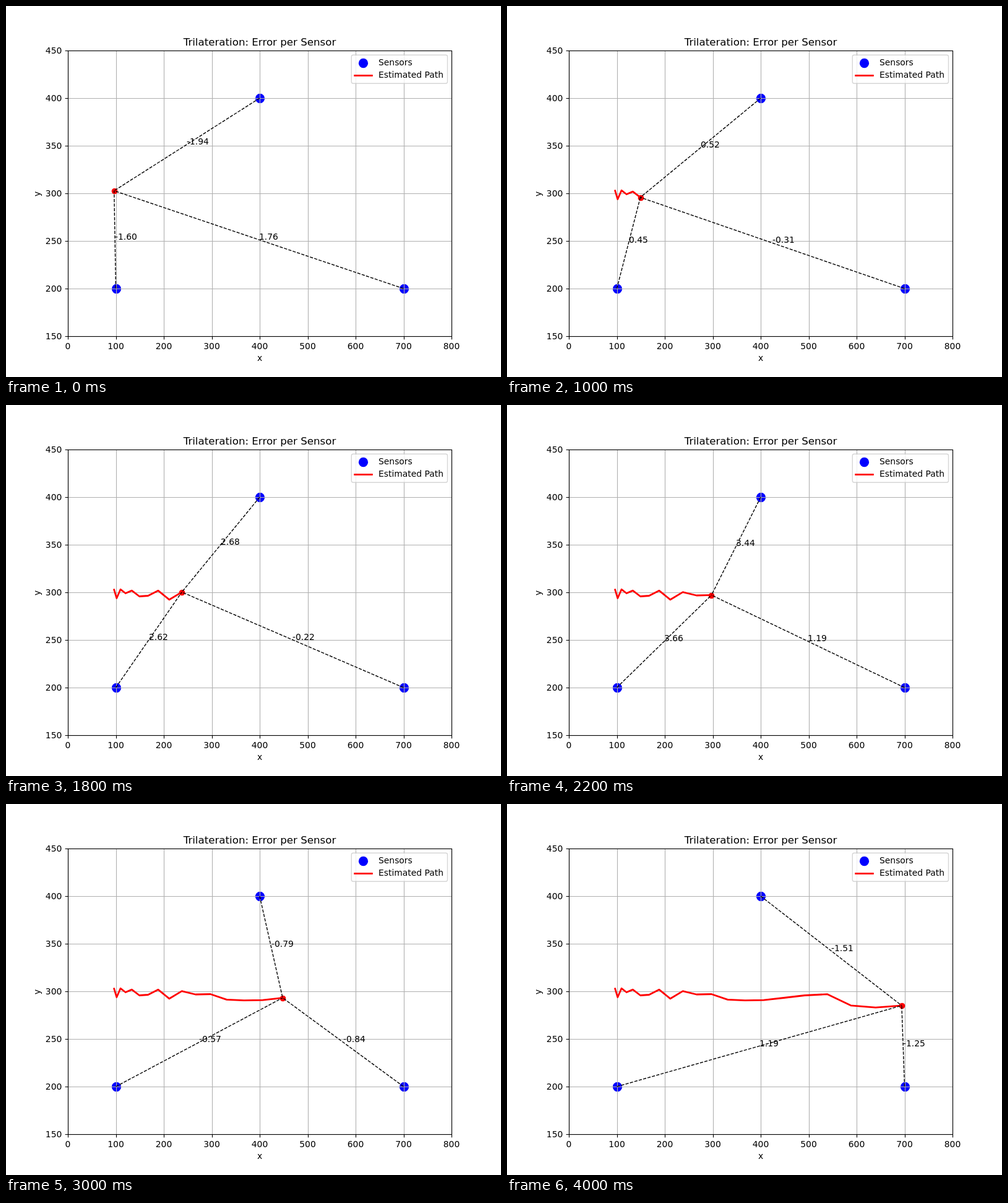
Recreate the animation shown at these times as an HTML page. Size 800 by 600 pixels, loop 4200 ms.

```html
<!DOCTYPE html>
<html lang="en">
<head>
<meta charset="utf-8">
<title>Trilateration: Error per Sensor</title>
<style>
  html, body { margin: 0; width: 100%; height: 100%; overflow: hidden; background: #fff; }
  svg { display: block; width: 800px; height: 600px; }
  text { font: 13.89px "DejaVu Sans", sans-serif; fill: #000; white-space: pre; }
  .title { font-size: 16.67px; }
  .mid { text-anchor: middle; }
  .end { text-anchor: end; }
  .sensor { fill: #00f; }
  .grid { stroke: #b0b0b0; stroke-width: 1.11; }
  .axis { stroke: #000; stroke-width: 1.11; fill: none; }
  .path { stroke: #f00; stroke-width: 2.78; stroke-linecap: square; stroke-linejoin: round; fill: none; }
  .ray { stroke: #000; stroke-width: 1.39; stroke-dasharray: 5.14 2.22; }
</style>
</head>
<body>
<svg id="stage" viewBox="0 0 800 600"></svg>
<script>
const STEP = 200;
const BOX = { left: 100, right: 720, top: 72, bottom: 534 };
const SENSORS = [[100, 200], [400, 400], [700, 200]];

// Noisy height of the estimate at each step, in pixels; its x speeds up evenly.
const HEIGHTS = [
  298.8, 312.5, 298.2, 304.5, 300.1, 309.5, 308.5, 300.2, 314.8, 302.6, 308,
  307.5, 316.4, 317.6, 317.2, 313.5, 309.5, 307.6, 325.8, 329.1, 326
];
const estimate = i => [174.7 + 3.16 * i + i * i, HEIGHTS[i]];

// Key steps and the signed size of the range error there
const SIZES = [[0, 3.067], [2, 1.632], [7, -2.349], [11, -5.159], [15, 1.29], [17, -2.982], [20, 2.292]];

const stage = document.getElementById("stage");
const px = x => BOX.left + x * 620 / 800;
const py = y => BOX.bottom - (y - 150) * 462 / 300;
const snap = v => Math.floor(v + 0.5) + 0.5;

function set(el, attrs) {
  for (const key in attrs) el.setAttribute(key, attrs[key]);
}
function add(tag, attrs, text) {
  const el = document.createElementNS("http://www.w3.org/2000/svg", tag);
  set(el, attrs);
  if (text !== undefined) el.textContent = text;
  return stage.appendChild(el);
}
const line = (cls, x1, y1, x2, y2) => add("line", { class: cls, x1, y1, x2, y2 });
const label = (cls, x, y, text) => add("text", { class: cls, x, y }, text);
const disc = (x, y) => add("circle", { class: "sensor", cx: x, cy: y, r: 7.64 });

function sizeAt(i) {
  const k = Math.max(1, SIZES.findIndex(([step]) => step >= i));
  const [[i0, a], [i1, b]] = [SIZES[k - 1], SIZES[k]];
  return a + (b - a) * (i - i0) / (i1 - i0);
}

// Least-squares residuals lie at right angles to both columns of direction cosines.
function residuals(x, y, size) {
  const [a, b, c] = spots.map(([sx, sy]) => {
    const d = Math.hypot(x - sx, y - sy);
    return [(x - sx) / d, (y - sy) / d];
  });
  const cross = (p, q) => q[0] * p[1] - p[0] * q[1];
  const n = [cross(b, c), cross(c, a), cross(a, b)];
  return n.map(v => v * size / Math.hypot(...n));
}

// Sensors and grid
const spots = SENSORS.map(([x, y]) => [px(x), py(y)]);
for (const [x, y] of spots) disc(snap(x), snap(y));

for (let v = 0; v <= 800; v += 100) {
  const x = snap(px(v));
  line("grid", x, BOX.top, x, BOX.bottom);
  line("axis", x, 534.5, x, 539.4);
  label("mid", px(v), 555, v);
}
for (let v = 150; v <= 450; v += 50) {
  const y = snap(py(v));
  line("grid", BOX.left, y, BOX.right, y);
  line("axis", 95.6, y, 100.5, y);
  label("end", 90.3, py(v) + 5, v);
}

// Moving parts
const trail = add("polyline", { class: "path" });
const dot = add("circle", { r: 4.86, fill: "#f00" });
const rays = spots.map(([x, y]) => line("ray", x, y, x, y));

add("rect", { class: "axis", x: 100.5, y: 72.5, width: 620, height: 462 });
label("mid title", 410, 64, "Trilateration: Error per Sensor");
label("mid", 410, 574, "x");
add("text", { class: "mid", transform: "translate(55 304) rotate(-90)" }, "y");
const notes = spots.map(() => label("", 0, 0, ""));

// Legend
add("rect", {
  x: 558.3, y: 79.3, width: 155.2, height: 46, rx: 2.78,
  fill: "#fff", stroke: "#ccc", "stroke-width": 1.39, opacity: 0.8
});
disc(577.5, 92.5);
line("path", 563.6, 112.5, 591.4, 112.5);
label("", 602, 96, "Sensors");
label("", 602, 116, "Estimated Path");

const points = HEIGHTS.map((_, i) => estimate(i));

function show(i) {
  const [x, y] = points[i];
  const errors = residuals(x, y, sizeAt(i));
  set(trail, { points: points.slice(0, i + 1).join(" ") });
  set(dot, { cx: snap(x), cy: snap(y) });
  spots.forEach(([sx, sy], k) => {
    set(rays[k], { x2: x, y2: y });
    set(notes[k], { x: Math.round((x + sx) / 2), y: Math.round((y + sy) / 2) });
    notes[k].textContent = errors[k].toFixed(2);
  });
}

const start = performance.now();
let shown = 0;
function tick() {
  const i = Math.floor((performance.now() - start) / STEP) % points.length;
  if (i !== shown) show(shown = i);
  requestAnimationFrame(tick);
}
show(0);
tick();
</script>
</body>
</html>
```
